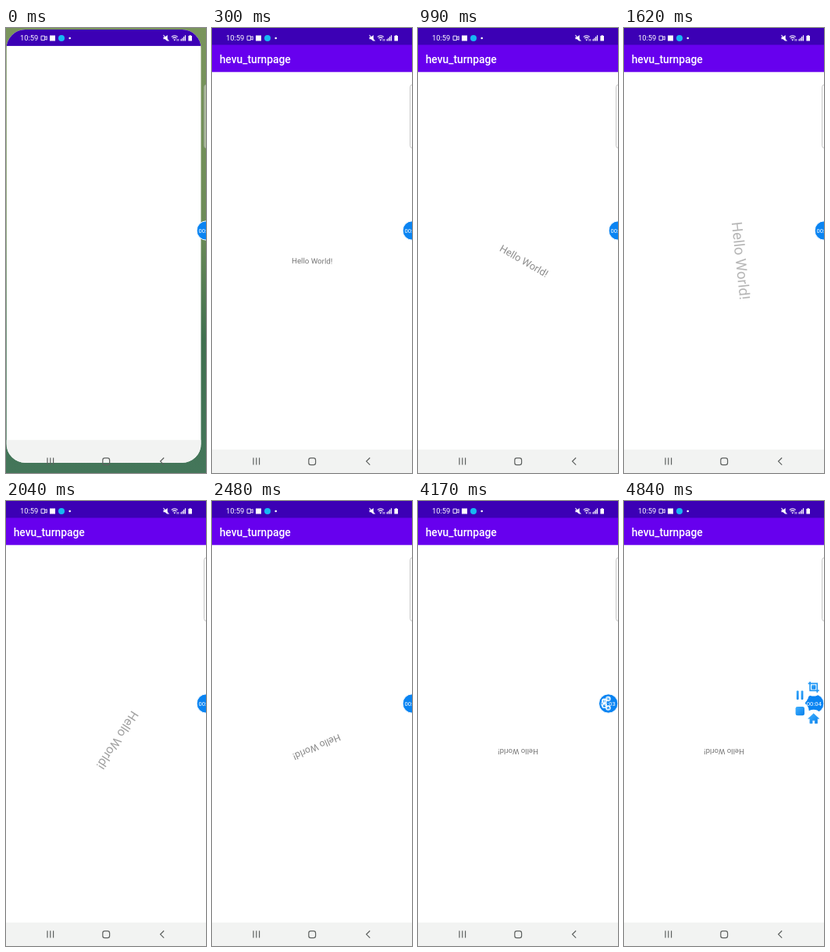
These frames come from a looping animation (256x569 px, 4.89 s). An HTML page:

```html
<!DOCTYPE html>
<html lang="en">
<head>
<meta charset="utf-8">
<title>Text animation on a phone</title>
<style>
  html, body { margin: 0; width: 100%; height: 100%; overflow: hidden; }
  svg { display: block; width: 100vw; height: 100vh; font-family: Roboto, "Noto Sans", sans-serif; }
</style>
</head>
<body>
<svg viewBox="0 0 256 569" preserveAspectRatio="none">
  <defs>
    <linearGradient id="wall" x2="0" y2="1">
      <stop offset="0" stop-color="#7a955c"/>
      <stop offset=".45" stop-color="#6d8c58"/>
      <stop offset=".7" stop-color="#40704f"/>
      <stop offset="1" stop-color="#44765a"/>
    </linearGradient>
    <linearGradient id="blue" x2="1" y2="1">
      <stop offset="0" stop-color="#41b0ff"/>
      <stop offset="1" stop-color="#077fea"/>
    </linearGradient>
    <clipPath id="corners"><rect id="frame" width="256" height="569"/></clipPath>
  </defs>

  <rect width="256" height="569" fill="url(#wall)"/>

  <g id="app" clip-path="url(#corners)">
    <rect width="256" height="569" fill="#fff"/>
    <rect y="539" width="256" height="30" fill="#f2f3f2"/>
    <g id="content">
      <rect y="20" width="256" height="36.3" fill="#6700ee"/>
      <text x="9.7" y="44.6" font-size="13.8" font-weight="500" fill="#fff">hevu_turnpage</text>
      <text id="hello" y="3.7" font-size="9.6" fill="#757575" text-anchor="middle">Hello World!</text>
    </g>
    <rect width="256" height="21.5" fill="#3c00b5"/>
  </g>

  <!-- status bar -->
  <g fill="#fff">
    <text x="18" y="16.4" font-size="9.4">10:59</text>
    <path d="M45 10.2h4.6v5.4H45zM49.8 12l2.4-1.4v4.6l-2.4-1.4" fill="none" stroke="#fff" stroke-width=".9"/>
    <rect x="56" y="9.5" width="7" height="7"/>
    <circle cx="71" cy="13" r="4" fill="#17b8f2"/>
    <circle cx="81.7" cy="13" r="1.3"/>
    <path d="M201.5 11.5h2l3.2-2.6v8l-3.2-2.6h-2z"/>
    <path d="M201.4 9l7 7.6" stroke="#fff" stroke-width="1.1"/>
    <path d="M211.8 11.4q4-3.4 8 0M213.2 13.2q2.6-2.2 5.2 0" fill="none" stroke="#fff" stroke-width="1.1"/>
    <path d="M214.2 14.4h3.2l-1.6 2z"/>
    <path d="M219 14v2.6M220.8 14v2.6" stroke="#fff" stroke-width=".8"/>
    <path d="M223.5 14.2h1.2v2.3h-1.2zM225.3 12.7h1.2v3.8h-1.2zM227.1 11h1.2v5.5h-1.2zM228.9 9.3h1.2v7.2h-1.2z"/>
    <path d="M234.6 9.2h2.2v.8h1.2v6.6h-4.6V10h1.2z"/>
  </g>

  <!-- navigation bar -->
  <g fill="none" stroke="#5d605f" stroke-width="1.2">
    <path d="M53 549.5v9M56.8 549.5v9M60.6 549.5v9"/>
    <rect x="123.8" y="549.8" width="8.8" height="8.8" rx="2.6"/>
    <path d="M202.2 549.5l-4.6 4.6 4.6 4.6"/>
  </g>

  <rect x="253.6" y="72.5" width="8" height="81" rx="3" fill="#fff" fill-opacity=".4" stroke="#a4a4a4" stroke-opacity=".65"/>

  <!-- recorder bubble and its menu -->
  <g id="bubble">
    <circle r="12.2" fill="#0a84f2" stroke="#fff" stroke-width="1"/>
    <g id="menu">
      <g data-x="-1" data-y="-21">
        <circle r="11.5" fill="#fff"/>
        <path d="M-4.6-7v11.4h11.6M-7-4.6H4.6v11.6" fill="none" stroke="#1f96f4" stroke-width="1.6"/>
        <rect x="-2.7" y="-2.7" width="5.4" height="5.4" rx="1" fill="url(#blue)"/>
      </g>
      <g data-x="-18.7" data-y="-10.8">
        <circle r="11.5" fill="#fff"/>
        <rect x="-4.2" y="-5.6" width="2.8" height="11.4" rx="1" fill="url(#blue)"/>
        <rect x="1.6" y="-5.6" width="2.8" height="11.4" rx="1" fill="url(#blue)"/>
      </g>
      <g data-x="-18.5" data-y="9.5">
        <circle r="11.5" fill="#fff"/>
        <rect x="-5.6" y="-5.6" width="11.4" height="11.4" rx="2.4" fill="url(#blue)"/>
      </g>
      <g data-x="-1" data-y="19.3">
        <circle r="11.5" fill="#fff"/>
        <path d="M0-6.5L7 0H4.8v6H1.6V2.2h-3.2V6h-3.2V0H-7z" fill="url(#blue)" stroke="url(#blue)" stroke-width=".6" stroke-linejoin="round"/>
      </g>
    </g>
    <text id="timer" x="-.4" y="2.8" font-size="7.6" fill="#fff" text-anchor="middle"></text>
  </g>
</svg>

<script>
const LOOP = 4890, SPIN_START = 185, SPIN_TIME = 3000, SHIFT = 23.7;
const $ = id => document.getElementById(id);
const set = (el, attrs) => { for (const k in attrs) el.setAttribute(k, attrs[k]); };
const span = (t, from, to) => Math.min(1, Math.max(0, (t - from) / (to - from)));
const easeInOut = x => 0.5 - 0.5 * Math.cos(Math.PI * x);
const easeOut = x => 1 - (1 - x) ** 2;
const start = performance.now();

function openWindow(t) {
  const left = 1 - easeOut(span(t, 40, 180));
  set($('app'), { transform: `translate(${0.5 * left} ${2 * left}) scale(${1 - 0.0265 * left})` });
  set($('frame'), { rx: 25 * left });
  set($('content'), { visibility: t < SPIN_START ? 'hidden' : 'visible' });
}

// Right for the first half, then diagonally to below the starting point.
function spinText(t) {
  const p = easeInOut(span(t, SPIN_START, SPIN_START + SPIN_TIME));
  const peak = 1 - Math.abs(2 * p - 1);
  const x = 128 + SHIFT * peak;
  const y = 297.5 + SHIFT * Math.max(0, 2 * p - 1);
  set($('hello'), {
    transform: `translate(${x} ${y}) rotate(${180 * p}) scale(${1 + peak})`,
    opacity: 1 - 0.5 * peak
  });
}

function moveBubble(t) {
  const x = 256.3 - 12.6 * easeOut(span(t, 3190, 3285));
  set($('bubble'), { transform: `translate(${x} 259)` });
  $('timer').textContent = '00:0' + Math.floor(span(t, 200, 4200) * 4);
  const open = easeOut(span(t, 4140, 4340));
  set($('menu'), { visibility: open ? 'visible' : 'hidden' });
  for (const item of $('menu').children) {
    const { x, y } = item.dataset;
    set(item, { transform: `translate(${x * open} ${y * open}) scale(${open})` });
  }
}

function draw(now) {
  const t = Math.max(0, now - start) % LOOP;
  openWindow(t);
  spinText(t);
  moveBubble(t);
  requestAnimationFrame(draw);
}
draw(start);
</script>
</body>
</html>
```
